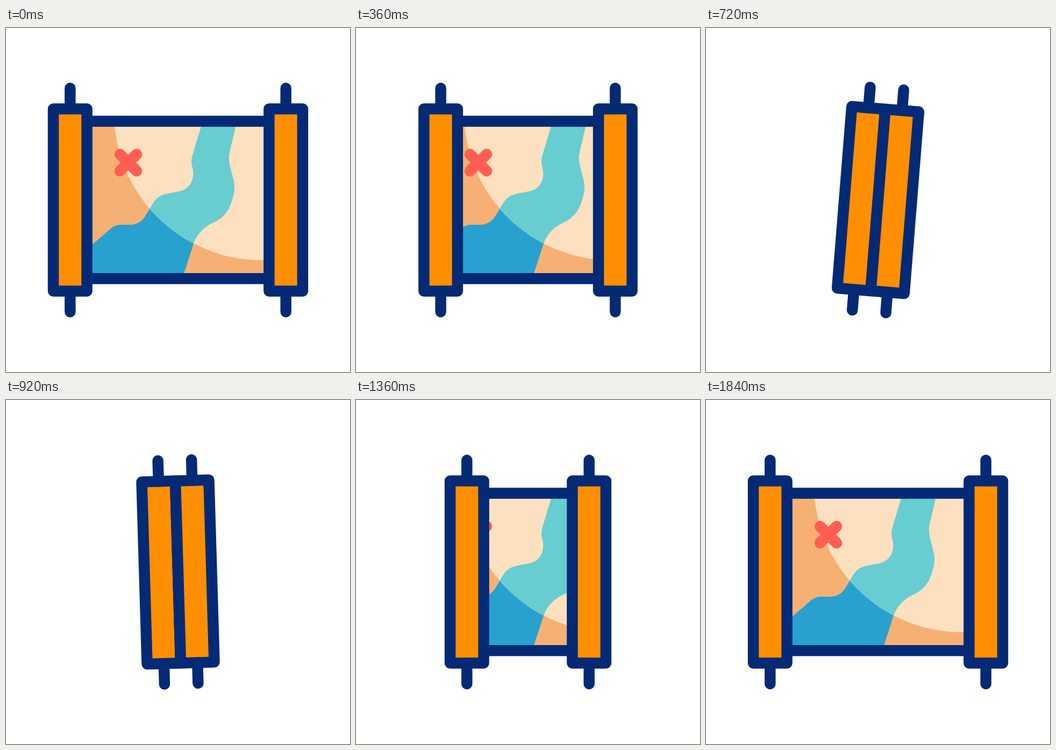
An HTML page with a canvas that plays this animation: 640x640 px, repeating every 2400 ms.

```html
<!DOCTYPE html>
<html lang="en">
<head>
<meta charset="utf-8">
<title>Treasure map scroll</title>
<style>
  html, body { margin: 0; height: 100%; overflow: hidden; background: #fff; }
  canvas { display: block; }
</style>
</head>
<body>
<canvas id="stage" width="640" height="640"></canvas>
<script>
const ctx = document.getElementById('stage').getContext('2d');
const LOOP = 2400, STEP = 40;
const MID = 320, OPEN = 200.7, CLOSED = 31.25, LINE = 20.5;
const NAVY = '#042a75', ORANGE = '#ff8f00', RED = '#ff5f52';
const SAND = '#f6b074', CREAM = '#fde0bf', BLUE = '#28a1cf', TEAL = '#67cdd1';

const river = new Path2D(`M365.4 175 L346.5 238 Q344 247 346 257
  C351 272 348 288 337 297 Q331 302 322 304 L298 308.5 Q282 312 274 325
  L261 347 Q252 364 234 366 L212 366 Q202 367 195 373 L150 412 V466 H328
  L349 401 Q357 379 378 366 L392 359 Q414 346 421 319 Q427 301 424 285
  L417 258 Q414 246 415 236 L429 175 Z`);
const lit = new Path2D();
lit.arc(476, 157, 275, 0, Math.PI * 2);

const part = (t, from, to) => Math.min(1, Math.max(0, (t - from) / (to - from)));
const smooth = u => u * u * (3 - 2 * u);

// cubic-bezier(.6, 0, .4, 1)
function ease(x) {
  let lo = 0, hi = 1;
  for (let i = 0; i < 24; i++) {
    const u = (lo + hi) / 2, v = 1 - u;
    if (1.8 * v * v * u + 1.2 * v * u * u + u * u * u < x) lo = u; else hi = u;
  }
  return smooth(lo);
}

// Rocking of the closed scroll: [time, degrees]
const rock = [[650, 0], [735, 5], [870, -5], [1000, 5], [1125, 0]];
function tilt(t) {
  let angle = 0;
  for (let i = 1; i < rock.length; i++) {
    const [t0, a0] = rock[i - 1], [t1, a1] = rock[i];
    angle += (a1 - a0) * smooth(part(t, t0, t1));
  }
  return angle * Math.PI / 180;
}

function fill(color, path) {
  ctx.fillStyle = color;
  ctx.fill(path);
}

function line(color, x0, y0, x1, y1) {
  ctx.strokeStyle = color;
  ctx.beginPath();
  ctx.moveTo(x0, y0);
  ctx.lineTo(x1, y1);
  ctx.stroke();
}

function drawMap(gap, mark) {
  ctx.save();
  ctx.beginPath();
  ctx.rect(MID - gap, 163, gap * 2, 314);
  ctx.clip();
  ctx.fillStyle = SAND;
  ctx.fillRect(100, 173, 440, 293);
  fill(BLUE, river);
  ctx.save();
  ctx.clip(lit);
  ctx.fillStyle = CREAM;
  ctx.fillRect(100, 173, 440, 293);
  fill(TEAL, river);
  ctx.restore();
  if (mark > 0) {
    const d = 31 * mark;
    line(RED, 212, 235, 212 + d, 235 + d);
    line(RED, 243, 235, 243 - d, 235 + d);
  }
  line(NAVY, 100, 173.5, 540, 173.5);
  line(NAVY, 100, 466.3, 540, 466.3);
  ctx.restore();
}

function drawRoller(x) {
  ctx.fillStyle = ORANGE;
  ctx.strokeStyle = NAVY;
  ctx.beginPath();
  ctx.rect(x - 31.25, 150.5, 62.5, 339);
  ctx.fill();
  ctx.stroke();
  line(NAVY, x, 112, x, 150.5);
  line(NAVY, x, 489.5, x, 528);
}

function draw(t) {
  const shut = ease(part(t, 180, 662)) - ease(part(t, 1131, 1594));
  const gap = OPEN + (CLOSED - OPEN) * shut;
  const mark = t < 900 ? 1 : smooth(part(t, 1324, 1833));

  ctx.fillStyle = '#fff';
  ctx.fillRect(0, 0, 640, 640);
  ctx.save();
  ctx.translate(MID, MID);
  ctx.rotate(tilt(t));
  ctx.translate(-MID, -MID);
  ctx.lineWidth = LINE;
  ctx.lineCap = ctx.lineJoin = 'round';
  drawMap(gap, mark);
  drawRoller(MID - gap);
  drawRoller(MID + gap);
  ctx.restore();
}

function tick() {
  const t = performance.now() % LOOP;
  draw(Math.floor(t / STEP) * STEP);
  requestAnimationFrame(tick);
}
tick();
</script>
</body>
</html>
```
